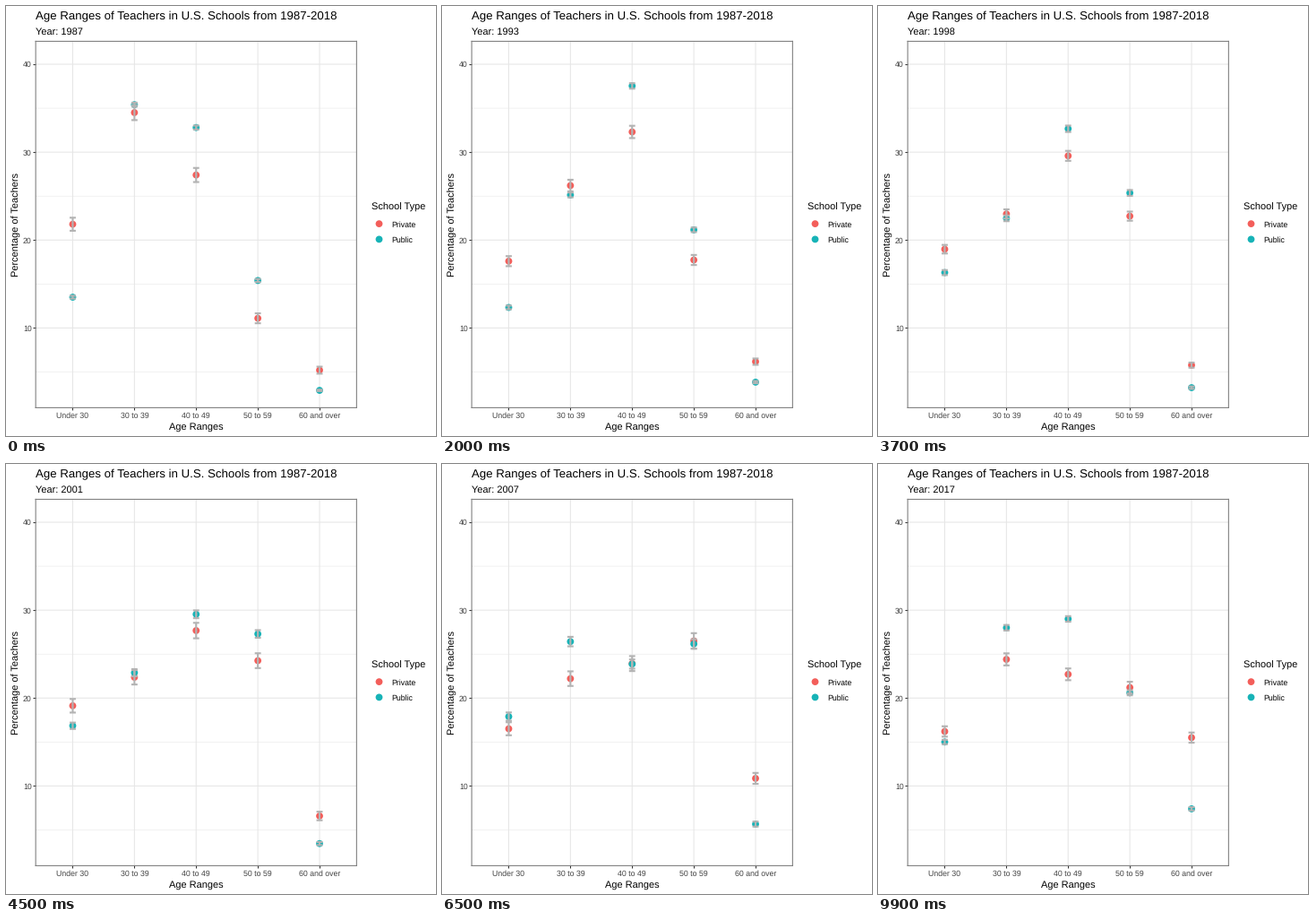
A matplotlib script that plays this animation: 480 px wide and 480 px high, repeating every 10000 ms.

```python
import matplotlib.pyplot as plt
import numpy as np
from matplotlib.animation import FuncAnimation
from matplotlib.collections import LineCollection

plt.rcParams.update({
    "font.family": "Liberation Sans",
    "text.hinting": "none",
    "path.snap": False,
    "toolbar": "None",
})

SIZE, DPI = 480, 72
FRAMES, INTERVAL = 100, 100
FIRST, LAST = 1987, 2017
LEFT, RIGHT, TOP, BOTTOM = 33.15, 391.35, 39.4, 448.4
RED, TEAL, BAR = "#F35E5A", "#17B3B7", "#B3B3B3"
DOT = 7.8 ** 2
CAP = 0.05

AGES = ["Under 30", "30 to 39", "40 to 49", "50 to 59", "60 and over"]
REST = AGES.index("50 to 59")
XS = np.arange(1, len(AGES) + 1)

# Bends of each trend line, year: percent. "50 to 59" is what is left of 100.
PRIVATE = [
    {1987: 21.8, 1990: 16.8, 1999: 19.2, 2003: 19.0, 2007: 16.3, 2011: 16.7, 2017: 16.2},
    {1987: 34.5, 1990: 28.1, 1999: 22.4, 2007: 22.2, 2011: 24.1, 2017: 24.4},
    {1987: 27.4, 1990: 33.9, 1999: 29.1, 2003: 25.4, 2007: 23.8, 2017: 22.7},
    {1987: 5.2, 1990: 6.4, 1999: 5.7, 2003: 8.0, 2011: 14.2, 2017: 15.5},
]
PUBLIC = [
    {1987: 13.5, 1990: 10.0, 1999: 17.0, 2003: 16.6, 2007: 18.0, 2011: 15.3, 2017: 15.0},
    {1987: 35.4, 1990: 26.7, 1999: 22.0, 2011: 28.9, 2017: 28.0},
    {1987: 32.8, 1990: 40.4, 1999: 31.8, 2003: 25.9, 2007: 23.7, 2011: 25.1, 2017: 29.0},
    {1987: 2.9, 1990: 4.2, 1999: 3.1, 2003: 4.0, 2011: 7.6, 2017: 7.4},
]
# Sampling error, as a factor of sqrt(p * (1 - p))
PRIVATE_ERR = {1987: 1.8, 1999: 1.2, 2003: 3.2, 2007: 1.9, 2011: 2.8, 2017: 1.6}
PUBLIC_ERR = {1987: 0.48, 1999: 0.8, 2003: 1.25, 2011: 1.2, 2017: 0.7}


def trend(bends, frame):
    """Straight lines between bends, each bend falling on a whole frame."""
    step = (LAST - FIRST) / (FRAMES - 1)
    keys = [round((year - FIRST) / step) for year in bends]
    return np.interp(frame, keys, list(bends.values()))


def shares(group, frame):
    known = [trend(bends, frame) for bends in group]
    return np.insert(known, REST, 100 - sum(known))


def spread(percent, factor):
    p = percent / 100
    return factor * np.sqrt(p * (1 - p))


def bar_segments(x, low, high):
    return [[(x, low), (x, high)],
            [(x - CAP, low), (x + CAP, low)],
            [(x - CAP, high), (x + CAP, high)]]


fig = plt.figure(figsize=(SIZE / DPI, SIZE / DPI), dpi=DPI, facecolor="white")
ax = fig.add_axes([LEFT / SIZE, 1 - BOTTOM / SIZE,
                   (RIGHT - LEFT) / SIZE, (BOTTOM - TOP) / SIZE])
ax.set(xlim=(0.4, 5.6), ylim=(0.93, 42.61))


def label(x, y, text, size=11, color="black", **kw):
    """Place text with its baseline at pixel (x, y) from the top left."""
    return fig.text(x / SIZE, 1 - y / SIZE, text, size=size, color=color,
                    va="baseline", **kw)


def to_px(x, y):
    px, py = ax.transData.transform((x, y))
    return px, SIZE - py


# Panel, grid and ticks
ax.set_axisbelow(True)
ax.set_xticks(XS, labels=[""] * len(XS))
ax.set_yticks(range(10, 50, 10), labels=[""] * 4)
ax.set_yticks(range(5, 45, 10), minor=True)
ax.grid(which="major", color="#E6E6E6", lw=1.07)
ax.grid(which="minor", axis="y", color="#E6E6E6", lw=0.53)
ax.tick_params(which="major", length=3, width=1.07, color="#333333")
ax.tick_params(which="minor", length=0)
for spine in ax.spines.values():
    spine.set(color="#7C7C7C", linewidth=1.07)

for x, age in zip(XS, AGES):
    label(to_px(x, 0)[0], 460, age, 8.8, "#424242", ha="center")
for v in range(10, 50, 10):
    label(28.6, to_px(1, v)[1] + 3.3, str(v), 8.8, "#424242", ha="right")

label(33, 15, "Age Ranges of Teachers in U.S. Schools from 1987-2018", 13.2)
year_text = label(33, 32, "")
label((LEFT + RIGHT) / 2, 473, "Age Ranges", ha="center")
label(14.6, (TOP + BOTTOM) / 2, "Percentage of Teachers", ha="center",
      rotation=90, rotation_mode="anchor")

# Legend
KEY_X, KEY_Y = 416.5, np.array([243.1, 260.4])
label(407.9, 228, "School Type")
for y, name in zip(KEY_Y, ["Private", "Public"]):
    label(430.6, y + 3.5, name, 8.8)
ax.scatter([KEY_X] * 2, SIZE - KEY_Y, s=DOT, c=[RED, TEAL], lw=0,
           clip_on=False, transform=None)

dots = ax.scatter(np.tile(XS, 2), np.zeros(2 * len(XS)), s=DOT, lw=0, zorder=3,
                  c=[RED] * len(XS) + [TEAL] * len(XS))
bars = LineCollection([], colors=BAR, linewidths=2.1, zorder=4)
ax.add_collection(bars, autolim=False)


def draw(frame):
    year = FIRST + (LAST - FIRST) * frame / (FRAMES - 1)
    year_text.set_text(f"Year: {round(year)}")
    points, segments = [], []
    for group, err in [(PRIVATE, PRIVATE_ERR), (PUBLIC, PUBLIC_ERR)]:
        mid = shares(group, frame)
        half = spread(mid, trend(err, frame))
        points += zip(XS, mid)
        for x, low, high in zip(XS, mid - half, mid + half):
            segments += bar_segments(x, low, high)
    dots.set_offsets(points)
    bars.set_segments(segments)
    return [dots, bars, year_text]


anim = FuncAnimation(fig, draw, frames=FRAMES, interval=INTERVAL,
                     repeat=True, repeat_delay=0, blit=False)
plt.show()
```
